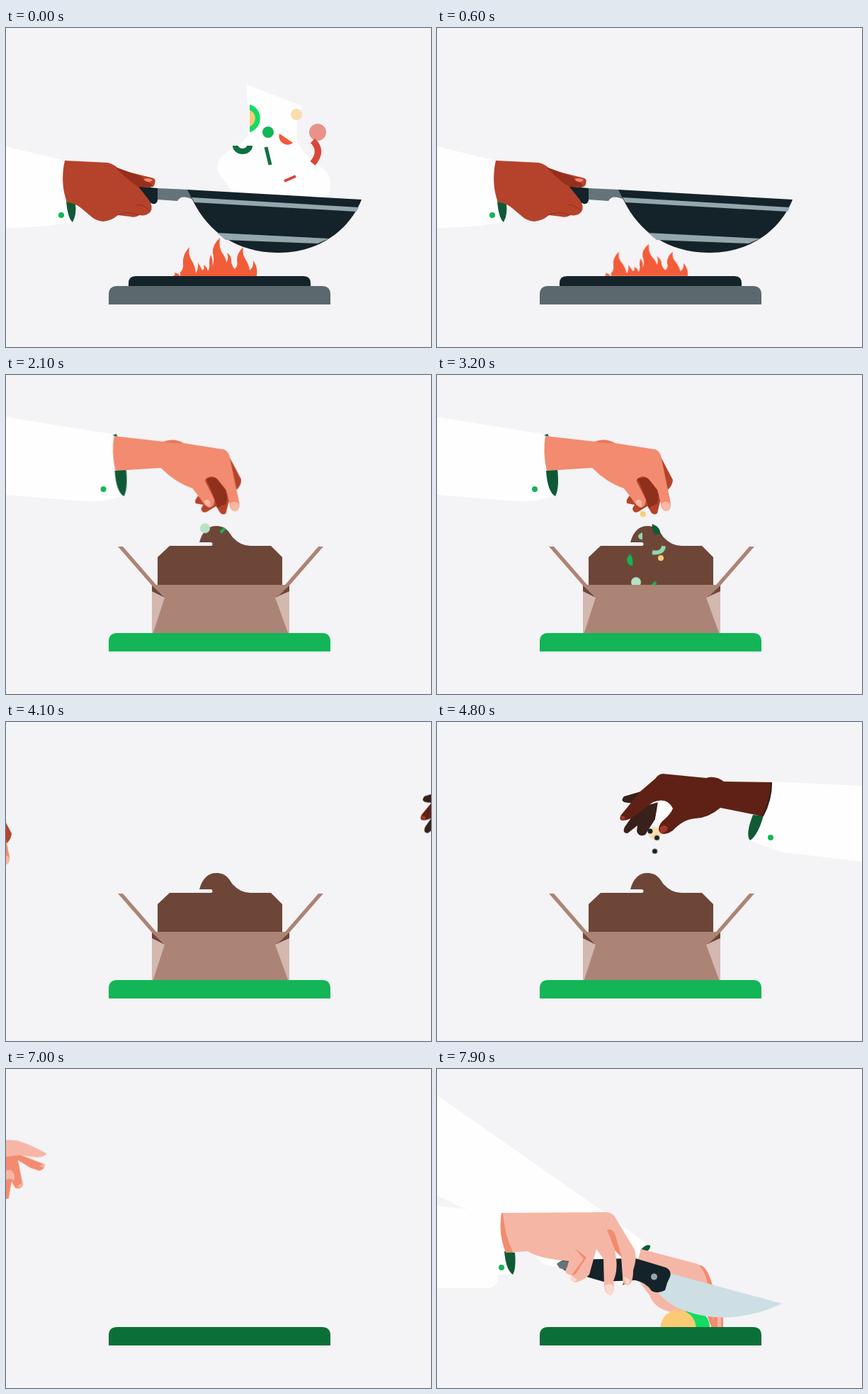
Write an HTML page that moves like this. It is 600 px wide and 450 px high and loops after 8 s.

```html
<!DOCTYPE html>
<html lang="en">
<head>
<meta charset="utf-8">
<title>Kitchen</title>
<style>
html, body { margin: 0; width: 100%; height: 100%; overflow: hidden; background: #f4f3f5; }
svg { display: block; width: 600px; height: 450px; }
svg [class] { animation: 8s ease-in-out infinite; }

.white { fill: #fefefe; }
.ink { fill: #14232a; }
.steel { fill: #94a6ae; }
.cuff { fill: #0f5a35; }
.green { fill: #13b557; }
.brown { fill: #6d4638; }
.card { fill: #ac8475; }
.side { fill: #d3b8b0; }
.rust { fill: #b5432b; }
.coral { fill: #f28b6f; }
.pink { fill: #f6b6a6; }
.umber { fill: #5f2115; }
.shade { fill: #38201b; }

/* Frying pan */
svg .pan { animation-name: pan; transform-origin: 85px 225px; }
@keyframes pan {
  0% { transform: none; }
  3% { transform: translateY(-5px) rotate(-1deg); }
  6% { transform: translateY(5px) rotate(1deg); }
  7.5% { transform: none; animation-timing-function: ease-in; }
  13.5%, 99.9% { transform: translateX(-530px); }
  100% { transform: none; }
}
svg .steam { animation-name: steam; transform-origin: 380px 245px; }
@keyframes steam { 0% { transform: none; } 5.5%, 100% { transform: scale(.8, 0); } }
svg .toss { animation-name: toss; }
@keyframes toss {
  0% { transform: translate(var(--x), var(--y)); animation-timing-function: ease-in; }
  5.5%, 100% { transform: translate(calc(var(--x) * .7 + 112px), 275px) rotate(50deg); }
}
svg .fire { animation-name: fire; transform-origin: 300px 350px; }
@keyframes fire { 0%, 10.5% { transform: none; } 13.2%, 100% { transform: scaleY(0); } }
svg .flicker { animation: flicker .4s ease-in-out infinite; transform-origin: 300px 350px; }
@keyframes flicker { 0%, 100% { transform: none; } 50% { transform: scaleY(.84) skewX(3deg); } }
svg .burner { animation-name: burner; }
@keyframes burner { 0%, 12.5% { transform: none; } 14.8%, 100% { transform: translateY(16px); } }
svg .base { animation-name: base; animation-timing-function: linear; }
@keyframes base {
  0%, 12.5% { fill: #5b686d; }
  16.25% { fill: #1da85a; }
  17.5%, 83.75% { fill: #13b557; }
  87%, 100% { fill: #0b7037; }
}

/* Box */
svg .body { animation-name: body; transform-origin: 303px 366px; }
@keyframes body {
  0%, 17% { transform: scaleY(0); }
  20.5%, 76% { transform: none; }
  78.7%, 100% { transform: scaleY(0); }
}
svg .lid { animation-name: lid; transform-origin: 303px 296px; animation-timing-function: linear; }
@keyframes lid {
  0%, 19.5% { transform: scaleY(0); }
  22.8%, 73% { transform: none; }
  75% { transform: scaleY(.6); }
  77%, 100% { transform: scaleY(0); }
}
svg .flap { animation-name: flap; transform-origin: 216px 304px; }
@keyframes flap {
  0%, 20% { transform: scale(0); }
  22.8%, 71.5% { transform: none; }
  74.3%, 100% { transform: scale(0); }
}

/* Sprinkling hands */
svg .left { animation-name: left; }
@keyframes left {
  0%, 18% { transform: translate(-350px, 30px); }
  23.5% { transform: translate(-45px, 5px); }
  26.5% { transform: none; }
  29% { transform: translate(6px, 5px); }
  32% { transform: translate(-6px, -2px); }
  35% { transform: translate(6px, 5px); }
  37.5% { transform: translate(-3px, 1px); }
  40% { transform: none; }
  43% { transform: translate(5px, 5px); }
  46% { transform: none; animation-timing-function: ease-in; }
  51.5%, 100% { transform: translate(-350px, 10px); }
}
svg .right { animation-name: right; }
@keyframes right {
  0%, 50% { transform: translateX(350px); }
  57% { transform: translateY(-6px); }
  60% { transform: none; }
  62.5% { transform: translate(5px, -14px); }
  65% { transform: translateY(-28px); }
  68.5% { transform: none; animation-timing-function: ease-in; }
  73.5%, 100% { transform: translateX(350px); }
}
svg .drop { animation-name: drop; animation-timing-function: linear; }
@keyframes drop {
  0% { opacity: 1; transform: translate(var(--x), var(--y)); }
  7.5% { opacity: 1; transform: translate(var(--x), var(--end)); }
  7.51%, 100% { opacity: 0; transform: translate(var(--x), var(--end)); }
}

/* Cutting */
svg .reach { animation-name: reach; }
@keyframes reach {
  0%, 84% { transform: translate(-75px, -25px); animation-timing-function: ease-in; }
  87.5% { transform: none; animation-timing-function: linear; opacity: 1; }
  91.5% { transform: translate(285px, 165px) rotate(12deg); opacity: 1; }
  91.51%, 100% { transform: translate(285px, 165px) rotate(12deg); opacity: 0; }
}
svg .hold { animation-name: hold; }
@keyframes hold {
  0%, 91.5% { transform: translate(-50px, -40px); opacity: 0; animation-timing-function: ease-out; }
  91.51% { transform: translate(-50px, -40px); opacity: 1; }
  94%, 100% { transform: none; opacity: 1; }
}
svg .chop { animation-name: chop; transform-origin: 95px 250px; }
@keyframes chop {
  0%, 92.5% { transform: translate(-500px, -90px) rotate(-12deg); }
  96.2% { transform: translate(-20px, -35px) rotate(-9deg); }
  98.75%, 100% { transform: none; }
}
</style>
</head>
<body>
<svg viewBox="0 0 600 450">
  <!-- pan -->
  <g class="fire"><path class="flicker" fill="#f25c39" d="M235 350 Q240 349 238 345 Q244 346 245 350 Q247 348 246 345 Q251 340 250 332 Q249 319 259 309 Q257 319 261 326 Q267 335 268 346 Q272 339 271 331 Q275 337 277 342 Q281 339 279 334 Q284 337 285 343 Q288 338 287 332 Q287 325 289 320 Q293 328 291 336 Q295 328 292 317 Q291 306 302 296 Q300 309 305 317 Q311 325 311 331 Q315 325 312 317 Q319 321 318 331 Q321 339 323 340 Q328 335 326 328 Q326 317 335 309 Q333 319 338 326 Q343 334 344 342 Q350 337 349 328 Q356 337 354 350Z"/></g>
  <path class="burner ink" d="M173 366 V360 Q173 350 183 350 H420 Q430 350 430 360 V366Z"/>
  <g class="pan">
    <path class="steam white" d="M340 80 L418 110 Q408 132 411 160 C424 188 448 194 456 208 Q461 222 454 240 L318 234 C314 216 298 209 298 194 C300 174 336 168 342 149 C347 125 338 100 340 80Z"/>
    <g id="food"></g>
    <path class="white" d="M-80 152 L0 167 L83 187 Q78 220 87 246 Q89 265 95 274 L60 279 L0 283 H-80Z"/>
    <path class="cuff" d="M85 244 L98 248 Q100 263 94 274 Q87 268 85 244Z"/>
    <circle class="green" cx="78" cy="264" r="4"/>
    <path class="ink" d="M184 223 L214 226 V243 Q213 249 207 248 L196 243Z"/>
    <path class="rust" d="M83 187 L144 190 Q153 192 160 200 L205 211 Q213 212 210 220 Q209 225 204 224 L187 224 L199 239 Q209 251 204 259 Q199 266 188 264 Q183 268 175 266 L158 264 Q149 272 137 273 Q126 272 118 264 L106 254 Q96 246 86 246 Q76 218 83 187Z"/>
    <path fill="#962f1c" d="M154 196 L190 209 L206 221 L204 225 L188 224 Q177 220 154 196Z"/>
    <path class="coral" d="M194 213 Q202 211 207 214 Q204 219 197 216Z"/>
    <path fill="none" stroke="#962f1c" d="M184 250 Q192 247 203 258 M157 264 Q170 257 188 264"/>
    <path fill="#65747a" d="M214 226 L258 228 L264 242 Q247 234 242 244 L214 242Z"/>
    <path class="ink" d="M256 228 L502 242 C483 289 437 318 383 317 C325 316 286 288 264 244Z"/>
    <path class="steel" d="M262 239 L498 253 L495 259 L266 246Z M298 289 L456 297 L440 304 L310 299Z"/>
  </g>

  <!-- box -->
  <g class="body">
    <path class="lid brown" d="M214 297 V257 L231 241 H289 a2.5 2.5 0 0 0 0-5 H273 C277 221 285 213 297 213 C311 213 315 222 320 229 Q331 241 345 241 H374 L390 257 V297Z"/>
    <g id="herbs"></g>
    <path class="side" d="M206 296 H400 V366 H206Z"/>
    <path class="brown" d="M206 296 L224 314 L206 305Z M400 296 L380 314 L400 305Z"/>
    <path class="card" d="M206 296 H400 L380 314 L399 366 H207 L224 314Z"/>
    <path class="flap card" d="M158 242 H165 L212 296 L224 314 L206 297Z"/>
    <g transform="matrix(-1 0 0 1 606 0)">
      <path class="flap card" d="M158 242 H165 L212 296 L224 314 L206 297Z"/>
    </g>
  </g>

  <!-- sprinkling from the left -->
  <g class="left">
    <path class="white" d="M-60 50 L0 59 L154 84 Q149 110 155 135 Q158 162 165 171 L140 177 Q122 179 100 177 L0 169 H-60Z"/>
    <path class="cuff" d="M154 135 L170 132 Q173 160 167 171 Q156 165 154 135Z M151 85 L156 83 L158 87Z"/>
    <circle class="green" cx="138" cy="161" r="4"/>
    <path class="rust" d="M314 112 L333 148 Q332 156 327 161 L318 166 L311 195 Q306 199 302 193 L297 185 L284 193 Q277 196 276 188 L279 183 L268 181 Q266 176 273 169 L282 147Z"/>
    <path fill="#8f301d" d="M283 146 L297 144 L314 163 L311 182 L299 187 L291 164Z"/>
    <path class="coral" d="M153 86 L223 94 Q237 89 251 96 L308 105 Q314 107 316 114 L330 181 Q330 193 323 192 Q316 190 316 181 L311 162 L299 147 Q290 139 281 148 L295 176 Q295 187 287 187 Q280 184 276 176 L264 160 Q240 152 219 131 L155 135 Q149 110 153 86Z"/>
    <path fill="#e87758" d="M223 94 Q237 88 251 96 Q237 97 223 94Z"/>
    <path fill="#f9b9a4" d="M317 181 Q323 176 329 181 Q330 192 323 192 Q317 190 317 181Z M280 178 Q285 173 289 179 L289 186 Q283 186 280 178Z"/>
  </g>

  <!-- sprinkling from the right -->
  <g class="right">
    <path class="white" d="M473 84 L600 90 L660 92 V204 L600 197 L490 184 Q470 179 442 167Z"/>
    <path class="cuff" d="M446 131 L461 132 Q453 160 442 167 Q435 159 446 131Z"/>
    <circle class="green" cx="471" cy="163" r="4"/>
    <path class="shade" d="M298 95 L264 105 Q259 110 264 113 Q280 117 298 108Z M284 121 L265 148 Q261 157 269 157 L283 146 L282 154 Q285 163 294 159 L308 137 L313 113Z"/>
    <path class="white" d="M308 137 L312 112 H332 L333 123 L316 147Z"/>
    <circle cx="307" cy="157" r="9" fill="#fbdcae"/>
    <circle class="ink" cx="301" cy="154" r="3.5"/>
    <path class="umber" d="M473 85 L405 84 Q393 75 380 79 L319 73 Q313 73 308 80 L287 98 L260 131 Q256 138 262 139 Q271 139 281 131 L305 113 Q325 105 333 122 Q330 130 318 140 Q309 151 316 157 Q323 160 333 153 Q348 137 365 136 Q384 135 400 121 L460 133 Q473 110 473 85Z"/>
    <path class="shade" d="M471 85 H473 Q473 111 461 133 L459 132 Q471 106 471 85Z"/>
    <path fill="#a5372a" d="M314 149 Q321 143 326 149 Q324 157 316 157Z M259 133 Q264 131 266 136 L261 139Z"/>
  </g>
  <g id="pepper"></g>

  <!-- cutting -->
  <g class="reach">
    <path class="white" d="M-420 -60 L-80 85 L-75 145 L-420 90Z"/>
    <path class="coral" d="M-80 108 L18 120 L54 134 Q54 141 46 143 L34 139 L16 128 L23 163 Q21 170 12 167 L7 158 L3 182 H-3 L-20 150 L-80 130Z"/>
    <path class="pink" d="M-80 88 L-20 99 L14 100 Q37 107 57 119 Q52 124 43 124 L18 121 L0 123 L-80 128Z M-20 144 L6 142 Q13 147 11 157 L4 154 L-12 160Z M46 136 L54 133 L53 139Z M14 165 L22 160 L21 167Z"/>
  </g>
  <g class="hold">
    <path class="white" d="M-60 -5 L0 37 L236 202 L300 249 L265 305 L150 275 L90 215 L30 193 L0 178 L-60 160Z"/>
    <path class="cuff" d="M287 256 Q295 246 301 249 Q302 254 295 258Z M262 305 L266 292 L272 300Z"/>
    <path class="coral" d="M355 275 L372 277 Q381 279 388 302 L404 350 V366 H388Z"/>
    <path class="pink" d="M288 254 L368 275 Q378 283 382 302 L401 352 V366 H392 L388 345 L372 350 L330 343 Q306 337 300 319 L278 290Z"/>
    <path class="coral" d="M390 350 H396 V366 H391Z"/>
    <circle cx="361" cy="364" r="24" fill="#13db63"/>
    <circle cx="340.500" cy="365" r="25" fill="#fbcb74"/>
  </g>
  <g class="chop">
    <path class="white" d="M-140 180 L0 193 L92 203 Q88 240 98 259 L107 289 L86 290 Q87 309 70 309 L0 309 H-140Z"/>
    <path class="cuff" d="M95 257 L110 259 Q112 282 107 290 Q97 283 95 257Z"/>
    <circle class="green" cx="91" cy="280" r="4"/>
    <path fill="#cddfe4" d="M328 288 L487 331 Q457 345 427 349 Q385 354 350 341 Q325 332 312 315Z"/>
    <path class="ink" d="M170 276 Q173 268 190 269 L280 267 L323 280 Q332 284 329 293 Q324 302 322 312 Q312 318 303 313 Q295 301 280 298 L235 300 L180 284Z"/>
    <path fill="#65747a" d="M169 275 Q175 269 187 272 L184 284 L173 281Z"/>
    <circle class="steel" cx="306.500" cy="293" r="4.500"/>
    <path class="pink" d="M91 203 L240 202 Q248 203 252 210 L279 255 Q283 266 277 284 Q277 303 269 305 Q261 304 262 293 L260 264 L251 256 Q257 281 249 299 Q252 315 245 319 Q237 317 236 306 L235 268 L225 254 L215 290 Q208 298 196 301 Q187 300 190 291 Q177 289 184 279 L186 271 Q142 267 128 257 L98 259 Q86 235 91 203Z"/>
    <path class="coral" d="M91 203 Q87 234 97 259 L107 258 Q96 236 93 203Z M240 227 Q248 224 252 235 L261 266 L252 257Z M194 252 L211 266 L195 290 L190 291 L207 268Z"/>
    <path fill="#fcd9ce" d="M237 306 Q243 300 249 306 Q250 318 245 319 Q238 316 237 306Z M263 293 L272 297 Q272 305 268 304Z M190 292 L198 297 L194 301 Q188 299 190 292Z"/>
  </g>
  <path class="base" d="M145 390 V376 Q145 364 157 364 H446 Q458 364 458 376 V390Z"/>
</svg>
<script>
const make = (parent, cls, vars, art, delay = 0) => {
  const g = document.createElementNS("http://www.w3.org/2000/svg", "g");
  g.setAttribute("class", cls);
  for (const key in vars) g.style.setProperty("--" + key, vars[key] + "px");
  g.style.animationDelay = delay + "ms";
  g.innerHTML = art;
  document.getElementById(parent).append(g);
};
const dot = (r, fill) => `<circle r="${r}" fill="${fill}"/>`;
const shape = (d, fill) => `<path d="${d}" fill="${fill}"/>`;
const line = (d, color, width) => `<path d="${d}" fill="none" stroke="${color}" stroke-width="${width}"/>`;

[
  [344, 127, shape("M0-19A19 20 0 0 1 0 20Z", "#13db63") + shape("M0-11A11 12 0 0 1 0 12Z", "#f7ca75")],
  [370, 147, dot(8, "#13b557")],
  [334, 166, line("M-10 0A10 8 0 0 0 10 0", "#0f7040", 8)],
  [370, 181, line("M-3-13L3 12", "#0f7040", 5)],
  [395, 157, shape("M-9-8L10 5A12 12 0 0 1-9-8Z", "#f05a38")],
  [410, 122, dot(8, "#fbdcae")],
  [440, 147, dot(12, "#e8928a")],
  [437, 176, line("M-4-17Q11-3-4 15", "#d8473a", 9)],
  [401, 212, line("M-8 4L8-3", "#d8473a", 4)]
].forEach(([x, y, art]) => make("food", "toss", { x, y }, art));

// x, start in ms, art
const herbs = [
  [291, 3170, dot(4, "#fbcb74")],
  [310, 3060, shape("M-6-8L0-5Q6 0 5 6L-2 7Q-8 0-6-8Z", "#0f5a35")],
  [287, 3014, shape("M3-5V5Q-3 4-3 0Q-2-4 3-5Z", "#8fd9ab")],
  [313, 2920, line("M7-5Q6 6-9 4", "#8fd9ab", 6)],
  [316, 2860, dot(4, "#fbcb74")],
  [272, 2845, shape("M0-9Q6-3 4 8Q-4 7-4-2Z", "#13b557")],
  [281, 2690, dot(7, "#b5e3c5")],
  [306, 2675, line("M-3 3L3-3", "#13b557", 4)]
];
for (const shift of [-720, 0, 520])
  for (const [x, at, art] of herbs)
    if (at + shift < 3450) make("herbs", "drop", { x, y: 190, end: 310 }, art, at + shift - 8000);

const grain = dot(3.6, "#14232a");
for (const shift of [0, 220])
  for (const [x, at] of [[307.500, 4680], [310.500, 4751]])
    make("pepper", "drop", { x, y: 150, end: 310 }, grain, at + shift - 8000);

// The grains sink behind the front of the box.
document.getElementById("pepper").style.clipPath = "polygon(0 0, 600px 0, 600px 296px, 0 296px)";
</script>
</body>
</html>
```
